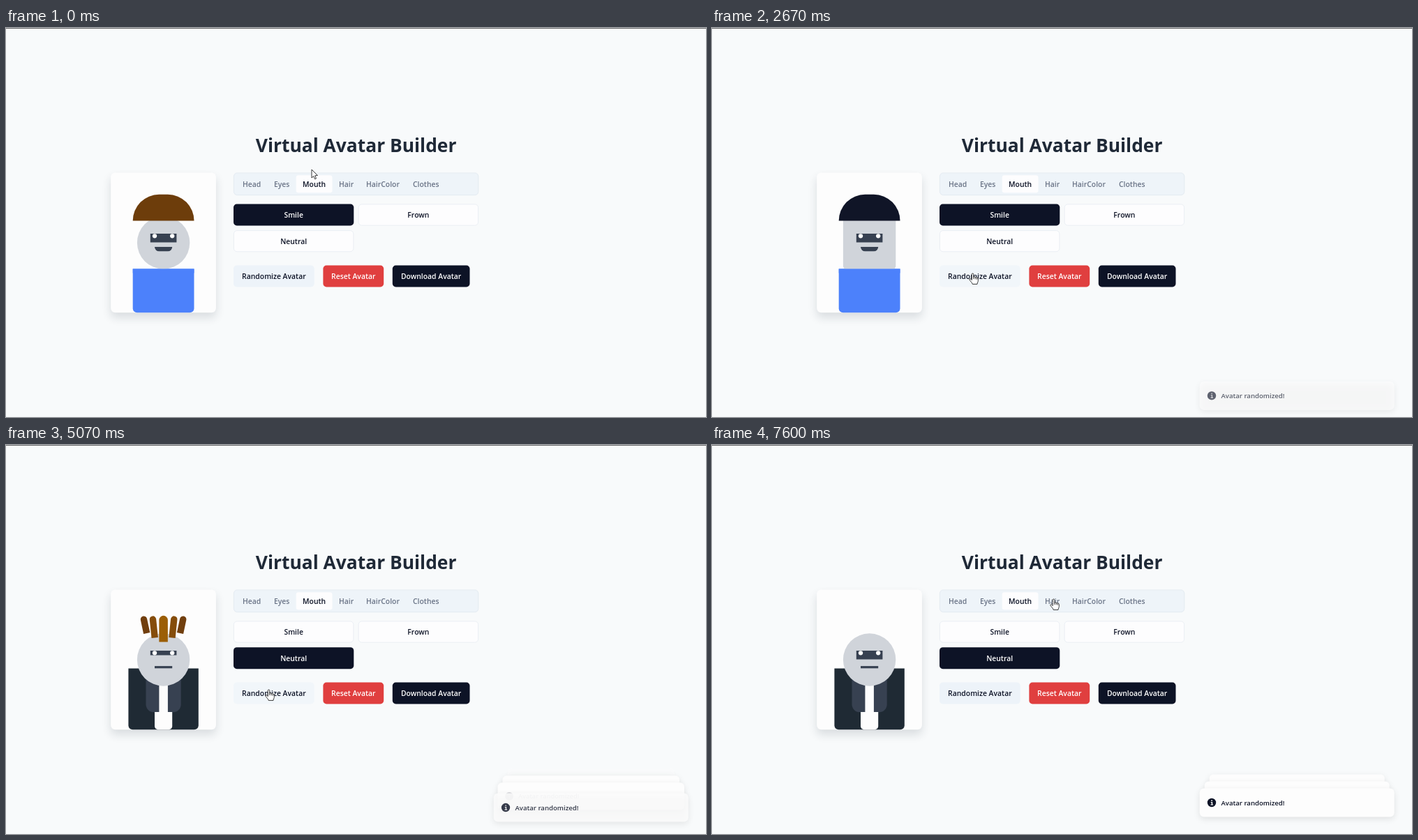
Write an HTML page with a canvas that moves like this. It is 1003x558 px and loops after 8 s.

```html
<!DOCTYPE html>
<html lang="en">
<head>
<meta charset="utf-8">
<title>Virtual Avatar Builder</title>
<style>
  html, body { margin: 0; width: 100%; height: 100%; overflow: hidden; background: #f8fafb; }
  canvas { display: block; width: 1003px; height: 558px; }
</style>
</head>
<body>
<canvas id="stage"></canvas>
<script>
const W = 1003, H = 558, LOOP = 8000;
const canvas = document.getElementById('stage');
const ctx = canvas.getContext('2d');
const dpr = window.devicePixelRatio || 1;
canvas.width = W * dpr;
canvas.height = H * dpr;

const FONT = '"Open Sans", "Noto Sans", sans-serif';
const INK = '#0d1326', SKIN = '#d0d4da', SLATE = '#374151';

// Each look holds from its time until the next one.
const looks = [
  { at: 0,    head: 'round',  eyes: 'wide',   mouth: 'Smile',   hair: 'short', color: '#6d3d0b', top: 'shirt' },
  { at: 2520, head: 'square', eyes: 'wide',   mouth: 'Smile',   hair: 'short', color: '#101527', top: 'shirt' },
  { at: 3270, head: 'square', eyes: 'wide',   mouth: 'Smile',   hair: 'short', color: '#101527', top: 'suit' },
  { at: 3970, head: 'round',  eyes: 'wide',   mouth: 'Frown',   hair: 'short', color: '#6d3d0b', top: 'suit' },
  { at: 4330, head: 'round',  eyes: 'narrow', mouth: 'Smile',   hair: 'short', color: '#b01717', top: 'shirt' },
  { at: 4860, head: 'round',  eyes: 'narrow', mouth: 'Neutral', hair: 'spiky', top: 'suit' },
  { at: 5600, head: 'square', eyes: 'wide',   mouth: 'Frown',   hair: 'short', color: '#b01717', top: 'shirt' },
  { at: 6180, head: 'square', eyes: 'wide',   mouth: 'Neutral', hair: 'spiky', top: 'shirt' },
  { at: 6655, head: 'round',  eyes: 'wide',   mouth: 'Neutral', hair: 'none',  top: 'suit' }
];
const clicks = looks.slice(1).map(look => look.at);

// Pointer path: time, x, y of the tip.
const path = [
  [0, 438, 203], [30, 438, 203], [700, 441, 237], [1030, 441, 237],
  [1250, 470, 315], [1450, 538, 398], [1640, 500, 362], [1830, 444.5, 354],
  [1870, 444.5, 354], [2350, 373.5, 352], [3600, 373.5, 352], [3800, 376.5, 351],
  [7180, 376.5, 351], [7580, 489.5, 221], [LOOP, 489.5, 221]
];

const tabs = [['Head', 339], ['Eyes', 384], ['Mouth', 425], ['Hair', 477], ['HairColor', 516], ['Clothes', 583]];
const options = [
  { label: 'Smile', x: 326, y: 252.5, w: 172.3, h: 31 },
  { label: 'Frown', x: 504.7, y: 252.5, w: 172.3, h: 31 },
  { label: 'Neutral', x: 326, y: 290.2, w: 172.3, h: 31 }
];
const actions = [
  { label: 'Randomize Avatar', x: 326, y: 340.5, w: 115.7, h: 31, bg: [237, 243, 249], hot: [241, 246, 250], fg: INK },
  { label: 'Reset Avatar', x: 454.4, y: 340.5, w: 86.8, h: 31, bg: [224, 63, 63], hot: [228, 86, 86], fg: '#fff' },
  { label: 'Download Avatar', x: 553.8, y: 340.5, w: 110.7, h: 31, bg: [13, 19, 38], hot: [36, 42, 60], fg: '#fff' }
];
const tabRow = { x: 330, y: 211, w: 298, h: 25 };
const hotspots = [tabRow, ...options, ...actions];

const clamp = v => Math.max(0, Math.min(1, v));
const mix = (a, b, k) => a + (b - a) * k;
const smooth = k => k * k * (3 - 2 * k);
const rgb = (a, b, k) => `rgb(${a.map((v, i) => Math.round(mix(v, b[i], k)))})`;
const inside = (p, r) => p.x >= r.x && p.x <= r.x + r.w && p.y >= r.y && p.y <= r.y + r.h;

// The CSS "ease" curve: cubic-bezier(.25, .1, .25, 1).
function ease(x) {
  x = clamp(x);
  const bez = (a, b, s) => 3 * a * s * (1 - s) ** 2 + 3 * b * s * s * (1 - s) + s ** 3;
  let lo = 0, hi = 1;
  for (let i = 0; i < 20; i++) {
    const mid = (lo + hi) / 2;
    if (bez(.25, .25, mid) < x) lo = mid; else hi = mid;
  }
  return bez(.1, 1, lo);
}

function pointer(t) {
  t = Math.max(0, t);
  let i = 1;
  while (i < path.length - 1 && path[i][0] < t) i++;
  const [t0, x0, y0] = path[i - 1], [t1, x1, y1] = path[i];
  const k = smooth(clamp((t - t0) / (t1 - t0)));
  return { x: mix(x0, x1, k), y: mix(y0, y1, k) };
}

const lookAt = t => looks.reduce((now, look) => look.at <= t ? look : now);

// Soft on/off: how much of the last 150 ms the test was true.
function soft(test, t) {
  let sum = 0;
  for (let i = 0; i < 10; i++) sum += test(t - i * 15) ? 1 : 0;
  return sum / 10;
}

function box(x, y, w, h, r, fill, stroke) {
  ctx.beginPath();
  ctx.roundRect(x, y, w, h, r);
  if (fill) { ctx.fillStyle = fill; ctx.fill(); }
  if (stroke) { ctx.strokeStyle = stroke; ctx.lineWidth = .8; ctx.stroke(); }
}

function disc(x, y, r, fill) {
  ctx.beginPath();
  ctx.arc(x, y, r, 0, 7);
  ctx.fillStyle = fill;
  ctx.fill();
}

function shadow(color, blur, dy) {
  ctx.shadowColor = color;
  ctx.shadowBlur = blur * dpr;
  ctx.shadowOffsetY = dy * dpr;
}

function text(str, x, y, size, fill, align = 'left', weight = 600) {
  ctx.font = `${weight} ${size}px ${FONT}`;
  ctx.textAlign = align;
  ctx.fillStyle = fill;
  ctx.fillText(str, x, y);
}

function drawTabs() {
  box(326.4, 207.9, 350.4, 31.8, 5, '#eef4f9', '#e0e8ef');
  box(415.7, 211.2, 51.8, 25, 3.2, '#fdfdfe');
  for (const [label, x] of tabs) text(label, x, 228.3, 10.4, label === 'Mouth' ? INK : '#697386');
}

function drawButton(b, bg, fg, border) {
  if (border) box(b.x + .4, b.y + .4, b.w - .8, b.h - .8, 4.7, bg, border);
  else box(b.x, b.y, b.w, b.h, 4.7, bg);
  text(b.label, b.x + b.w / 2, b.y + 19.9, 10.4, fg, 'center');
}

function drawButtons(t) {
  for (const o of options) {
    const on = soft(s => lookAt(s).mouth === o.label, t);
    const hot = soft(s => inside(pointer(s), o), t);
    const base = [0, 1, 2].map(i => mix([253, 253, 254][i], [13, 19, 38][i], on));
    const over = [0, 1, 2].map(i => mix([241, 245, 249][i], [36, 42, 60][i], on));
    drawButton(o, rgb(base, over, hot), rgb([13, 19, 38], [255, 255, 255], on), on < .5 && '#e6ebf1');
  }
  for (const a of actions) {
    const hot = soft(s => inside(pointer(s), a), t);
    drawButton(a, rgb(a.bg, a.hot, hot), a.fg);
  }
}

function spike(x, y, w, h, deg, fill) {
  ctx.save();
  ctx.translate(x, y);
  ctx.rotate(deg * Math.PI / 180);
  box(-w / 2, -h / 2, w, h, [w / 2, w / 2, 0, 0], fill);
  ctx.restore();
}

function drawAvatar(look) {
  ctx.save();
  shadow('rgba(30,41,59,.14)', 13, 7);
  box(150.2, 207.4, 150.7, 200.8, 6.2, '#fdfdfd');
  ctx.restore();

  const cx = 225.6;
  if (look.top === 'suit') {
    box(cx - 50.2, 320.4, 100.4, 87.8, [0, 0, 6, 6], '#1f2a34');
    box(cx - 25.1, 320.4, 50.2, 62.8, [0, 0, 11, 11], SLATE);
    box(cx - 6.2, 320.4, 12.5, 62.8, 0, '#fdfdfd');
    box(cx - 12.6, 383, 25.2, 25.2, [0, 0, 5, 5], '#fdfdfd');
  } else {
    box(cx - 43.9, 345.5, 87.8, 62.7, [0, 0, 6, 6], '#4c81fb');
  }

  if (look.head === 'round') disc(cx, 308, 37.7, SKIN);
  else box(cx - 37.7, 270.3, 75.4, 75.4, 4.5, SKIN);
  if (look.top === 'shirt') box(cx - 43.9, 345.5, 87.8, 6, 0, '#4c81fb');

  box(cx - 18.8, 295.1, 37.6, look.eyes === 'wide' ? 12.5 : 6.3, 0, SLATE);
  for (const side of [-1, 1]) disc(cx + side * 12.6, 298.3, 3.15, '#fff');

  if (look.mouth === 'Neutral') box(cx - 12.6, 317.1, 25.2, 3.2, 0, SLATE);
  else box(cx - 12.6, 314, 25.2, 6.3, look.mouth === 'Smile' ? [0, 0, 6.3, 6.3] : [6.3, 6.3, 0, 0], SLATE);

  if (look.hair === 'short') {
    box(cx - 43.9, 238.8, 87.8, 37.7, [37.7, 37.7, 0, 0], look.color);
  } else if (look.hair === 'spiky') {
    for (const side of [-1, 1]) {
      spike(cx + side * 26.5, 257.8, 9.4, 25.1, side * 12, '#713f0e');
      spike(cx + side * 14, 261, 9.4, 31.4, side * 6, '#854d0b');
    }
    spike(cx, 263.7, 12.5, 37.7, 0, '#9b5e06');
  }
}

function drawToast(depth, body, content) {
  ctx.save();
  ctx.globalAlpha = body;
  const lift = depth < 0 ? -41 * depth : -11 * depth;
  const scale = 1 - .05 * Math.max(0, depth);
  ctx.translate(838.2, 513 + lift);
  ctx.scale(scale, scale);
  ctx.save();
  shadow('rgba(0,0,0,.1)', 10, 3);
  box(-139.5, -20.5, 279, 41, 6.2, '#fdfdfd');
  ctx.restore();
  ctx.globalAlpha = body * content;
  disc(-122.2, 0, 6.2, INK);
  box(-123, -3.9, 1.8, 1.8, .9, '#fff');
  box(-123.6, -1, 2.4, 1.2, .4, '#fff');
  box(-122.4, -1, 1.3, 4.2, .4, '#fff');
  box(-123.8, 2.4, 3.8, 1.2, .4, '#fff');
  text('Avatar randomized!', -108.8, 3.6, 9.6, INK);
  ctx.restore();
}

function drawToasts(t) {
  const shown = clicks.filter(c => c <= t);
  shown.forEach((_, i) => {
    // Every later toast pushes this one a step back.
    const depth = shown.slice(i).reduce((d, c) => d + ease((t - c) / 400), -1);
    if (depth >= 3) return;
    const body = depth < 0 ? 1 + depth : clamp(3 - depth);
    drawToast(depth, body, clamp(1 - depth));
  });
}

const arrow = new Path2D('M0 0V12L2.7 9.5 4.6 13.7 6.5 12.9 4.7 8.8 8.4 8.5Z');
const hand = new Path2D('M-1.3 1.2C-1.3-.4 1.3-.4 1.3 1.2V5.3C1.7 4.3 3.6 4.6 3.7 5.8 4.2 5 5.8 5.3 5.9 6.4 6.5 5.8 7.8 6.2 7.8 7.4V10.6C7.8 12.4 6.7 13 6.5 15.4H-.3C-.5 13.2-3.5 11.2-4.5 9.2-5.1 7.9-3.5 7.2-2.6 8.2L-1.3 9.6Z');
const knuckles = new Path2D('M1.3 5V8M3.7 5.8V8.3M5.9 6.4V8.6');

function drawPointer(t) {
  const p = pointer(t);
  const overHot = hotspots.some(r => inside(p, r));
  ctx.save();
  ctx.translate(p.x, p.y);
  ctx.fillStyle = '#fff';
  ctx.strokeStyle = '#222';
  ctx.lineWidth = .9;
  ctx.lineJoin = 'round';
  const shape = overHot ? hand : arrow;
  ctx.fill(shape);
  ctx.stroke(shape);
  if (overHot) ctx.stroke(knuckles);
  ctx.restore();
}

function draw(t) {
  ctx.setTransform(dpr, 0, 0, dpr, 0, 0);
  ctx.fillStyle = '#f8fafb';
  ctx.fillRect(0, 0, W, H);
  ctx.fillStyle = '#6a6a6c';
  ctx.fillRect(0, 0, W, 1);
  text('Virtual Avatar Builder', 501.6, 178, 26.4, '#1f2937', 'center', 700);
  drawAvatar(lookAt(t));
  drawTabs();
  drawButtons(t);
  drawToasts(t);
  drawPointer(t);
}

const start = performance.now();
function tick() {
  draw((performance.now() - start) % LOOP);
  requestAnimationFrame(tick);
}
tick();
</script>
</body>
</html>
```
